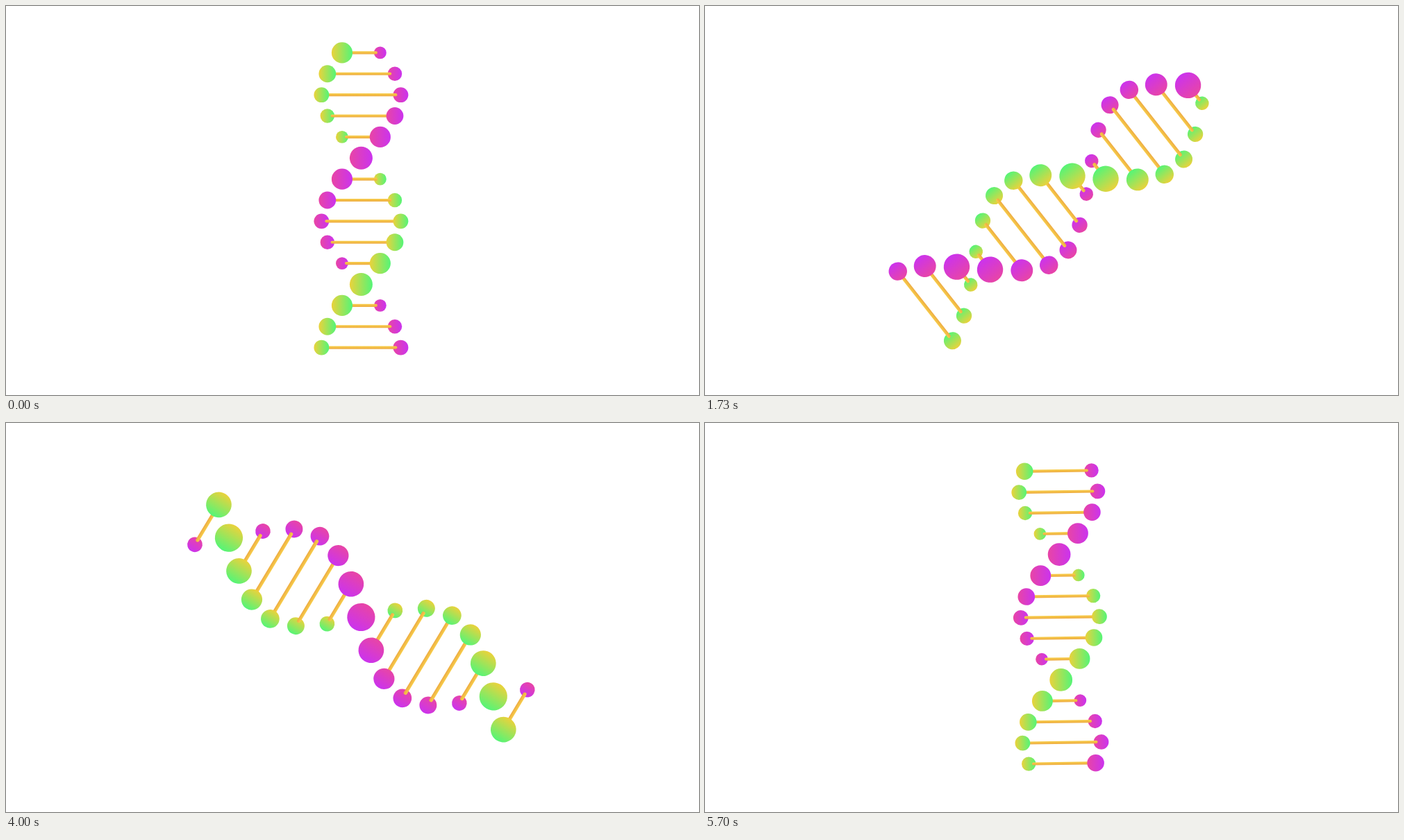
Recreate the animation shown at these times as an HTML page with a canvas. Size 998 px wide and 561 px high, loop 5730 ms.

```html
<!DOCTYPE html>
<html lang="en">
<head>
<meta charset="utf-8">
<title>Spinning helix</title>
<style>
  html, body { margin: 0; width: 100%; height: 100%; overflow: hidden; background: #fff; }
  canvas { display: block; }
</style>
</head>
<body>
<canvas id="stage" width="998" height="561"></canvas>
<script>
const ctx = document.getElementById('stage').getContext('2d');
const LOOP = 5730, TURN = 72, TWIST = 24;
const RUNGS = 15, GAP = 30.36, REACH = 57;
const GREEN = ['#ebd23b', '#54f577'];
const PURPLE = ['#e845a5', '#cb33ee'];
const GOLD = ['#f8ce4a', '#edab42'];

const ease = p => p * p * (3 - 2 * p);
const mod = (a, b) => ((a % b) + b) % b;

// Eased swing: 0 at whole u, 1 halfway between
function wave(u) {
  const p = mod(u, 1) * 2;
  return ease(p < 1 ? p : 2 - p);
}

function blend(x0, y0, x1, y1, [from, to]) {
  const g = ctx.createLinearGradient(x0, y0, x1, y1);
  g.addColorStop(0, from);
  g.addColorStop(1, to);
  return g;
}

function bead(x, y, u, colors) {
  const r = 10.95 + (mod(u, 1) < 0.5 ? -2.75 : 5.55) * wave(2 * u);
  ctx.fillStyle = blend(x - r, 0, x + r, 0, colors);
  ctx.beginPath();
  ctx.arc(x, y, r, 0, 2 * Math.PI);
  ctx.fill();
}

function bar(x, y) {
  const half = Math.abs(x) * (1 - 2 / REACH) - 3;
  if (half <= 0) return;
  ctx.fillStyle = blend(0, y - 2.1, 0, y + 2.1, GOLD);
  ctx.beginPath();
  ctx.roundRect(-half, y - 2.1, 2 * half, 4.2, Math.min(2.1, half));
  ctx.fill();
}

function rung(i, step) {
  const k = mod(2 * (i - 2) - step, TWIST);
  const u = k / TWIST;
  const x = REACH * (2 * wave(u) - 1);
  const y = (i - (RUNGS - 1) / 2) * GAP;
  const green = () => bead(x, y, u, GREEN);
  const purple = () => bead(-x, y, u + 0.5, PURPLE);
  const greenBehind = k > 0 && k < TWIST / 2;
  (greenBehind ? green : purple)();
  bar(x, y);
  (greenBehind ? purple : green)();
}

// 25 steps a second, shown on a 30 Hz clock rounded to 10 ms
function stepAt(ms) {
  const slot = Math.floor((Math.floor(ms / 10) + 0.34) * 0.3);
  return Math.floor(slot * 5 / 6);
}

function draw(ms) {
  const step = stepAt(ms % LOOP);
  const scale = 0.988 + 0.236 * wave((step + 5) / TURN);
  ctx.setTransform(1, 0, 0, 1, 0, 0);
  ctx.fillStyle = '#fff';
  ctx.fillRect(0, 0, 998, 561);
  ctx.translate(511.4, 280);
  ctx.rotate(2 * Math.PI * ease(mod(step, TURN) / TURN));
  ctx.scale(scale, scale);
  for (let i = 0; i < RUNGS; i++) rung(i, step);
}

const start = performance.now();
function tick() {
  draw(performance.now() - start);
  requestAnimationFrame(tick);
}
tick();
</script>
</body>
</html>
```
